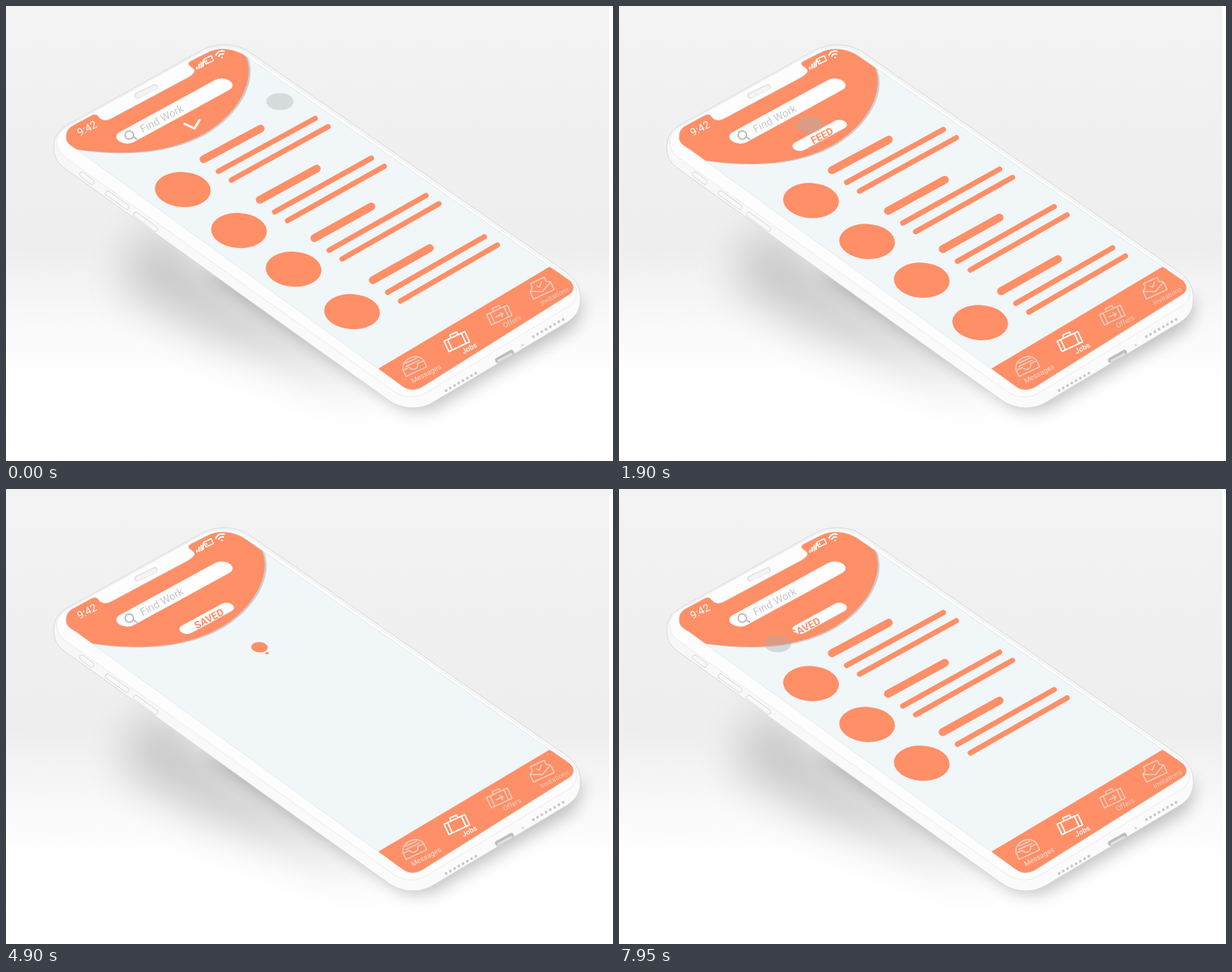
Write an HTML page that moves like this. It is 800 by 600 pixels and loops after 8000 ms.

```html
<!DOCTYPE html>
<html lang="en">
<head>
<meta charset="utf-8">
<title>Phone mockup</title>
<style>
html, body { margin: 0; width: 100%; height: 100%; overflow: hidden; background: #fff; }
svg { display: block; width: 800px; height: 600px; }
text { font-family: Roboto, Arial, sans-serif; }
.line { fill: none; stroke-linecap: round; stroke-linejoin: round; }
</style>
</head>
<body>
<svg id="stage" viewBox="0 0 800 600" xmlns="http://www.w3.org/2000/svg"></svg>
<script>
const LOOP = 8000, STEP = 50;
const ORANGE = '#ff8f67', PALE = '#e8cfc3';

// Plane of the screen: x runs up to the right, y down to the right.
const iso = (x, y, s = 1) =>
  `matrix(${.88 * s} ${-.48 * s} ${.81 * s} ${.585 * s} ${x} ${y})`;
// Text and icons are turned, not skewed.
const turn = (x, y, deg = -28) => `translate(${x} ${y}) rotate(${deg})`;
const pill = (x, y, len, r, fill) =>
  `<rect transform="${iso(x, y)}" x="${-len / 2 - r}" y="${-r}" width="${len + 2 * r}" height="${2 * r}" rx="${r}" fill="${fill}"/>`;
const label = (x, y, size, str, fill, extra = '') =>
  `<text transform="${turn(x, y)}" font-size="${size}" fill="${fill}" ${extra}>${str}</text>`;
const icon = (x, y, color, d, w = 1.5) =>
  `<path class="line" transform="${turn(x, y, -25)}" stroke="${color}" stroke-width="${w}" d="${d}"/>`;
const bar = (x, y, dx, slope, w) =>
  `<path class="line" stroke="${ORANGE}" stroke-width="${w}" d="M${x} ${y}l${dx} ${-dx * slope}"/>`;

const body = 'M63 186C63 171 70 163 84 155L253 61C275 48 300 48 320 60L728 344C750 358 757 370 757 385C757 400 752 408 741 416L562 523C545 533 523 532 506 521L76 213C66 205 63 197 63 186Z';
const face = 'M67 179C67 169 74 162 86 156L255 62C275 51 300 51 318 62L726 346C746 360 753 368 752 379C751 389 747 393 738 398L554 510C540 518 524 517 511 508L77 199C70 193 67 187 67 179Z';
const screen = 'M79 173C79 165 82 161 89 157L113 144C118 142 120 143 122 146C126 151 132 152 139 148L240 94C247 90 250 86 247 83C243 79 236 77 244 72L268 60C284 53 303 57 316 66L742 361C750 367 750 376 742 381L548 503C538 508 530 507 523 502L93 189C83 183 79 180 79 173Z';
const arc = 'M316 66C331 100 302 149 252 173C207 195 150 197 93 189L-20 150L190 -40Z';
const suitcase = 'M-15 -7H15V8H-15ZM-5 -7V-11H5V-7M-10 -7V8M10 -7V8';

const cards = [[233, 242], [307, 296], [379, 347], [456, 403]];
const holes = (x, y, n) => Array.from({ length: n }, (_, i) =>
  `<ellipse cx="${x + i * 5.6}" cy="${y - i * 3.25}" rx="1.8" ry="2.1" fill="#c9c9c9"/>`).join('');
const button = (x1, y1, x2, y2) =>
  `<path class="line" d="M${x1} ${y1}L${x2} ${y2}" stroke="#d3d3d3" stroke-width="7"/>
   <path class="line" d="M${x1} ${y1}L${x2} ${y2}" stroke="#f8f8f8" stroke-width="5.4"/>`;

// Bars lower on the screen rise a little more steeply.
const card = (_, i) => {
  const slope = .547 + .009 * i, y = -.5 * i;
  return `<g><circle r="30.7" fill="${ORANGE}"/>
    <g>${bar(27.5, y - 40, 75, slope - .01, 10.4)}${bar(47, y - 24, 127.5, slope, 7)}${bar(64, y - 12.5, 127.5, slope + .005, 7)}</g></g>`;
};

const stage = document.getElementById('stage');
stage.innerHTML = `
<defs>
  <linearGradient id="wall" x2="0" y2="1">
    <stop offset="0" stop-color="#f3f3f3"/><stop offset=".3" stop-color="#f0f0f0"/>
    <stop offset=".53" stop-color="#eee"/><stop offset=".68" stop-color="#f8f8f8"/>
    <stop offset=".8" stop-color="#fefefe"/><stop offset="1" stop-color="#fff"/>
  </linearGradient>
  <linearGradient id="shell" x1="0" y1="0" x2=".35" y2="1">
    <stop offset="0" stop-color="#f6f6f6"/><stop offset="1" stop-color="#fbfbfb"/>
  </linearGradient>
  <filter id="soft" x="-50%" y="-50%" width="200%" height="200%"><feGaussianBlur stdDeviation="28"/></filter>
  <filter id="near" x="-50%" y="-50%" width="200%" height="200%"><feGaussianBlur stdDeviation="11"/></filter>
  <clipPath id="glass"><path d="${screen}"/></clipPath>
  <clipPath id="slot"><rect transform="${iso(0, 0)}" x="-38" y="-8" width="76" height="16" rx="8"/></clipPath>
</defs>
<rect width="795" height="600" fill="url(#wall)"/>
<path d="M185 290L500 520L400 485L260 435L150 370Z" fill="#000" opacity=".17" filter="url(#soft)"/>
<path d="M260 350L525 533L560 533L748 424L762 388L600 380Z" fill="#000" opacity=".24" filter="url(#near)"/>
<path d="${body}" fill="url(#shell)" stroke="#d9d9d9"/>
<path d="${face}" fill="#fdfdfd" stroke="#ececec"/>
${button(100, 222, 113, 232)}${button(134, 247, 159, 265)}${button(171, 275, 197, 294)}
${holes(580, 507, 8)}${holes(695, 436, 8)}
<path class="line" d="M648 467L666 457" stroke="#bdbdbd" stroke-width="7"/>
<path class="line" d="M649 468L666 459" stroke="#e2e2e2" stroke-width="3"/>
<circle cx="681" cy="447" r="1.6" fill="#d5d5d5"/>
<path class="line" d="M173 118L196 107" stroke="#e3e3e3" stroke-width="8"/>
<path class="line" d="M174 118L196 107.5" stroke="#f4f4f4" stroke-width="5.5"/>
<g clip-path="url(#glass)">
  <path d="${screen}" fill="#f1f6f8"/>
  <g id="list">${cards.map(card).join('')}</g>
  <g id="head">
    <path d="${arc}" fill="#c9ced0" transform="translate(2.5 1)"/>
    <path d="${arc}" fill="${ORANGE}"/>
  </g>
  <path d="M491 478L716 344L780 370L540 540Z" fill="${ORANGE}"/>
</g>
<path d="${screen}" fill="none" stroke="#e3e6e7" stroke-width=".8"/>
${label(97, 172, 14, '9:42', '#fff')}
<path class="line" d="M251.5 83V81M254.5 82V77M257.5 81V74.5M260 79.5V72" stroke="#fff" stroke-width="2"/>
${icon(267, 71, '#fff', 'M-5.5 -3.5H5.5V3.5H-5.5ZM-3 -1V1')}
${icon(283, 64, '#fff', 'M-6 -2Q0 -7 6 -2M-3.5 1Q0 -2 3.5 1M0 4V4.5', 1.9)}
${pill(222, 138.5, 143, 11.4, '#fff')}
${icon(163, 170, '#bcbcbc', 'M5 0A5.5 5.5 0 1 1 -6 0A5.5 5.5 0 1 1 5 0M3 4L6 9', 1.9)}
${label(180, 167.5, 14, 'Find Work', '#c6c6c6')}
<path id="chevron" class="line" d="M235.5 155.5L248.5 161.5L255 150.5" stroke="#fff" stroke-width="3"/>
<g id="tab">
  ${pill(0, 1.2, 60, 8, '#d9a594')}${pill(0, 0, 60, 8, '#fff')}
  <g clip-path="url(#slot)">
    <g transform="${turn(0, 0)}" fill="${ORANGE}" font-size="13.5" font-weight="700" text-anchor="middle">
      <text id="feed" y="6.5">FEED</text><text id="saved" y="6.5">SAVED</text>
    </g>
  </g>
</g>
${icon(537, 474, PALE, 'M-15 9V-1Q-11 -11 0 -11Q11 -11 15 -1V9ZM-15 0H-6Q-5 5 0 5Q5 5 6 0H15M-10 -3H10M-8 -7H8')}
${icon(594, 442, '#fff', suitcase, 1.8)}
${icon(650, 407, PALE, suitcase + 'M-5 1H5M2 -2L5 1L2 4')}
${icon(705, 372, PALE, 'M-15 -2L-10 -5V-11H10V-5L15 -2V9H-15ZM-15 -2L0 5L15 -2M-4 -5L-1 -2L4 -7')}
${label(536, 498, 9.5, 'Messages', '#f3dfd6')}
${label(603, 459, 9.5, 'Jobs', '#fff', 'font-weight="500"')}
${label(657, 425, 9.5, 'Offers', PALE)}
${label(706, 395, 9, 'Invitations', PALE)}
<ellipse id="cursor" rx="18" ry="11.2" fill="#aaa"/>`;

const el = id => document.getElementById(id);
const [list, head, chevron, tab, feed, saved, cursor] =
  ['list', 'head', 'chevron', 'tab', 'feed', 'saved', 'cursor'].map(el);

const clamp = v => Math.min(1, Math.max(0, v));
const ease = v => (1 - Math.cos(Math.PI * clamp(v))) / 2;
const mix = (a, b, p) => a + (b - a) * p;
// Eased value from rows of [time, value, ...]
function track(t, keys, col = 1) {
  let i = 0;
  while (i < keys.length - 2 && t >= keys[i + 1][0]) i++;
  const a = keys[i], b = keys[i + 1];
  return mix(a[col], b[col], ease((t - a[0]) / (b[0] - a[0])));
}

const PATH = [[0, 361, 126], [1250, 247, 157], [1750, 247, 157], [3000, 382, 144],
  [3900, 272, 170], [3950, 272, 170], [4550, 209, 204], [7150, 209, 204],
  [7151, 272, 170], [7350, 272, 170], [7950, 209, 204]];
const SHADE = [[0, .35], [1200, .35], [1350, .8], [1500, .8], [2050, .35], [4500, .35],
  [4800, 0], [7100, 0], [7350, .4], [8000, .4]];
const DROP = [[1150, 0], [1500, 31], [1800, 20]];
const HEAD = [[1150, 0], [1500, 28], [1800, 21]];
const move = (node, x, y) => node.setAttribute('transform', `translate(${x} ${y})`);

function drawCards(t, drop) {
  move(list, drop, drop * .73);
  cards.forEach(([x, y], i) => {
    let p = 1 - ease((t - 4000 - i * 20) / 180);
    if (t >= 4300) p = i < 3 ? ease((t - 4790 - i * 60) / 300) : 0;
    const q = clamp((p - .3) / .7);
    const item = list.children[i], [dot, lines] = item.children;
    move(item, mix(314 + i * 10, x, q), mix(194 + i * 8, y, q));
    dot.setAttribute('transform', iso(0, 0, p));
    lines.setAttribute('transform', `scale(${q})`);
  });
}

function draw(t) {
  const shift = track(t, HEAD);
  move(head, shift, shift * .7);
  drawCards(t, track(t, DROP));

  const open = ease((t - 1450) / 350);
  chevron.style.opacity = 1 - clamp((t - 1450) / 150);
  tab.style.opacity = clamp(open * 2);
  tab.setAttribute('transform',
    `translate(${mix(247, 264.5, open)} ${mix(157, 170.5, open)}) scale(${open})`);

  const slide = 76 * ease((t - (t < 7000 ? 4415 : 7815)) / 350);
  const [near, far] = [2.5 - slide, 78.5 - slide];
  feed.setAttribute('x', t < 7000 ? near : far);
  saved.setAttribute('x', t < 7000 ? far : near);

  cursor.setAttribute('cx', track(t, PATH, 1));
  cursor.setAttribute('cy', track(t, PATH, 2));
  cursor.style.opacity = track(t, SHADE);
}

function tick() {
  draw(Math.floor(performance.now() % LOOP / STEP) * STEP);
  requestAnimationFrame(tick);
}
tick();
</script>
</body>
</html>
```
